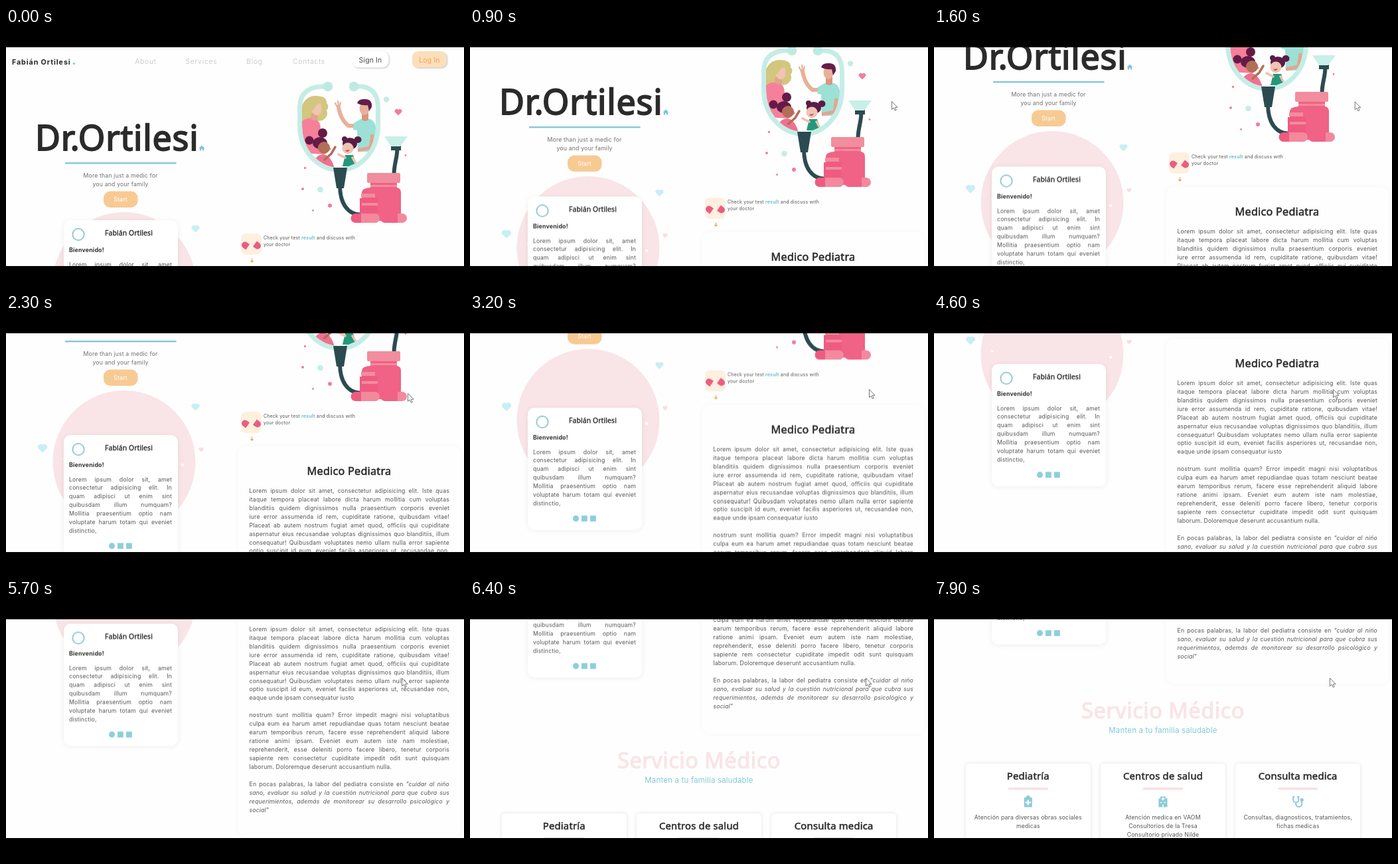
Recreate the animation shown at these times as an HTML page. Size 690 by 388 pixels, loop 8000 ms.

```html
<!DOCTYPE html>
<html lang="es">
<head>
<meta charset="utf-8">
<title>Medical practice page</title>
<style>
html, body { margin: 0; width: 100%; height: 100%; overflow: hidden; background: #000; }
#stage { position: relative; width: 690px; height: 388px; background: #fefefe; overflow: hidden; clip-path: inset(29px 0 30px);
  font: 8.7px Inter, sans-serif; letter-spacing: .02em; color: #555; }
#page, #card { position: absolute; left: 0; top: 0; will-change: transform; }
svg { position: absolute; left: 0; top: 0; overflow: visible; }
.head { font-family: "Noto Sans", sans-serif; letter-spacing: .015em; fill: #2b2b2b; stroke: #2b2b2b; stroke-width: .036em; }
.head.pale { fill: #fae4e6; stroke: #fae4e6; }
.mid { text-anchor: middle; }
.lines { position: absolute; }
.lines div { height: 12.96px; line-height: 12.96px; text-align: justify; text-align-last: justify; }
.lines div.end { text-align-last: left; }
#panel { position: absolute; left: 350px; top: 361px; width: 335px; height: 380px; border-radius: 12px; background: #fefefe; box-shadow: 0 0 10px rgba(0,0,0,.03); }
#box { position: absolute; left: 87px; top: 288.5px; width: 172px; height: 184px; border-radius: 10px; background: #fff; box-shadow: 0 1px 9px rgba(0,0,0,.07); }
.tile { fill: #fff; filter: drop-shadow(0 0 2.5px rgba(0,0,0,.11)); }
.button { filter: drop-shadow(1px 1px 1.2px rgba(0,0,0,.24)); }
</style>
</head>
<body>
<div id="stage">
  <div id="page">
    <div id="panel"></div>
    <svg width="690" height="1000" fill="#555">
      <defs>
        <path id="heart" d="M0 5L-5 0A3.1 3.1 0 0 1 0-3.6A3.1 3.1 0 0 1 5 0Z"/>
        <clipPath id="frame"><path d="M446 84H558V146C558 188 530 210 502 210S446 188 446 146Z"/></clipPath>
      </defs>

      <!-- navigation -->
      <text x="9" y="54.7" font-size="10.7" font-weight="700" letter-spacing=".9" fill="#262626">Fabián Ortilesi</text>
      <circle cx="102.5" cy="53.5" r="1.8" fill="#8fd3da"/>
      <g class="mid" font-size="10.2" font-weight="300" letter-spacing=".85" fill="#bdbdbd">
        <text x="210.5" y="53.7">About</text><text x="294.5" y="53.7">Services</text>
        <text x="374.5" y="53.7">Blog</text><text x="456.5" y="53.7">Contacts</text>
      </g>
      <rect class="button" x="522" y="35" width="54.5" height="24.5" rx="9" fill="#fff"/>
      <rect class="button" x="612" y="35" width="52" height="24.5" rx="9" fill="#fcdfba"/>
      <g class="mid" font-size="10.4">
        <text x="549" y="51.5" fill="#4a4a4a">Sign In</text><text x="638" y="51.5" fill="#f2a154">Log In</text>
      </g>

      <!-- hero -->
      <text class="head" x="44" y="184" font-size="52">Dr.Ortilesi</text>
      <path d="M290.5 181L295 176.5 299.5 181H298.2V184.6H296V182H294V184.6H291.8V181Z" fill="#7cc5d6"/>
      <rect x="89" y="202" width="167.5" height="2.4" fill="#84cad6"/>
      <g class="mid" fill="#707070">
        <text x="172.5" y="225.3">More than just a medic for</text>
        <text x="172.5" y="238.3">you and your family</text>
      </g>
      <rect x="147" y="245.5" width="51.5" height="24.5" rx="10" fill="#f8ca93"/>
      <text class="mid" x="172.5" y="261" font-size="8.8" fill="#fff">Start</text>
      <circle cx="178" cy="384.5" r="107.5" fill="#f9e4e7"/>
      <g fill="#c8eef6">
        <use href="#heart" transform="translate(285.5 302) scale(1.1)"/>
        <use href="#heart" transform="translate(55 364) scale(1.3)"/>
        <use href="#heart" transform="translate(294 366) scale(.7)" fill="#fadde2"/>
      </g>
      <g fill="#fff"><circle cx="266" cy="389" r="2.2"/><circle cx="88" cy="380" r="1.8"/></g>

      <!-- family inside the stethoscope -->
      <g clip-path="url(#frame)">
        <path d="M446 116Q453 101 468 102Q484 103 483 113Q488 118 483 124Q487 132 477 139L446 143Z" fill="#d3c67e"/>
        <path d="M444 142Q452 134 464 136Q474 139 474 152L475 166 490 182 480 190 444 188Z" fill="#f5809a"/>
        <path d="M460 128H470V137Q464 142 459 136Z" fill="#dfa58f"/>
        <path d="M461 113H474Q477 124 473 130Q466 134 461 126Z" fill="#f0c5b2"/>
        <path d="M457 112Q466 103 480 110Q468 112 463 124Q455 121 457 112Z" fill="#d3c67e"/>
        <path d="M532 147L516 147Q504 138 501 119" fill="none" stroke="#e8b09a" stroke-width="6" stroke-linecap="round"/>
        <path d="M500 121L496 113M501 119L500 110M502 120L504 112" stroke="#e8b09a" stroke-width="2.2" stroke-linecap="round"/>
        <path d="M524 143L534 137H549Q558 141 558 156V186H530L529 154 523 153Z" fill="#9de0d6"/>
        <path d="M552 160L549 180 530 184" fill="none" stroke="#e4a48e" stroke-width="5" stroke-linejoin="round"/>
        <path d="M536 128H546V138Q541 142 536 138Z" fill="#d9967f"/>
        <ellipse cx="540" cy="121" rx="7.5" ry="10" fill="#e8b09a"/>
        <path d="M529 113Q531 106 541 107Q552 107 551 119L547 125 545 116Q536 117 529 113Z" fill="#641e49"/>
        <path d="M464 207Q464 192 477 190Q490 191 495 212Z" fill="#f0708f"/>
        <g fill="#651b47"><circle cx="457" cy="169" r="6.5"/><circle cx="477" cy="158" r="7"/><ellipse cx="473" cy="173" rx="11" ry="9"/></g>
        <ellipse cx="479" cy="180" rx="9" ry="9" fill="#b26f58"/>
        <path d="M480 198L490 189 496 179" fill="none" stroke="#b26f58" stroke-width="3.5" stroke-linecap="round"/>
        <path d="M511 191H523L528 208H507Z" fill="#24987c"/>
        <path d="M511 195L501 190M522 195L526 202" stroke="#efc0ad" stroke-width="3.5" stroke-linecap="round"/>
        <g fill="#591c46"><circle cx="510" cy="167" r="4"/><ellipse cx="530" cy="168" rx="5.5" ry="5"/><ellipse cx="518" cy="174" rx="11" ry="9"/></g>
        <ellipse cx="515" cy="181" rx="8.5" ry="8.5" fill="#f0c4b2"/>
        <path d="M511 184Q515 189 518 183Z" fill="#d74865"/>
      </g>
      <path d="M485 88H473Q442.5 91 442.5 120V146C442.5 188 473 213.5 502 213.5S560.5 188 560.5 146V120Q560.5 91 536 88H524" fill="none" stroke="#c4ede6" stroke-width="7"/>
      <g fill="#bdeae2"><circle cx="485" cy="88" r="7.3"/><circle cx="524" cy="88" r="7.3"/></g>
      <g fill="none" stroke="#2b4b51" stroke-width="6">
        <path d="M503 236C503 263 514 281 536 281"/><path d="M589.5 180C589.5 197 584.5 203 584.5 221"/>
      </g>
      <path d="M493 210H514L509 241H498ZM580 177H595V184H580Z" fill="#2b4b51"/>
      <path d="M570 163H605L594 178H580Z" fill="#c8efe8"/>
      <path d="M549 232H589V240Q595 241 595 247V290H536V247Q536 241 549 240Z" fill="#f06286"/>
      <rect x="544" y="218" width="50" height="15" rx="2" fill="#f18d9e"/>
      <path d="M536 251H555V256H560V290H533V256H536Z" fill="#ef5b80"/>
      <path d="M535 249H556V255H535ZM536 263H560V267H536ZM549 236H589V239H549Z" fill="#f18d9e"/>
      <rect x="519.5" y="279" width="43" height="14" rx="7" fill="#ef5b80"/>
      <path d="M535 279H556A7 7 0 0 1 556 293H535ZM571 279H597A7 7 0 0 1 597 293H571Z" fill="#f3899d"/>
      <path d="M571 279A7 7 0 0 0 571 293H590V279Z" fill="#f06286"/>
      <g fill="#f17f9a">
        <use href="#heart" x="591" y="126.5"/>
        <circle cx="450.5" cy="210.5" r="1.7"/><circle cx="447" cy="242" r="2"/><circle cx="488" cy="267" r="3"/>
        <circle cx="462.5" cy="274.5" r="1.4"/><circle cx="602" cy="191.5" r="1.4"/>
      </g>
      <g fill="#c4ede6"><circle cx="573" cy="107.5" r="4.2"/><circle cx="473.5" cy="243" r="4.3"/></g>

      <!-- test result note -->
      <rect x="354" y="309" width="31" height="32" rx="8" fill="#fdf0de"/>
      <g fill="#ec5c82">
        <path d="M-5-5H0A5 5 0 0 1 0 5H-5Z" transform="translate(360 326.5) rotate(215)"/>
        <path d="M-5-5H0A5 5 0 0 1 0 5H-5Z" transform="translate(379 327.5) rotate(35)"/>
      </g>
      <path d="M370.5 346.5V352M368.3 350L370.5 352.2 372.7 350" fill="none" stroke="#f0a44e" stroke-width="1.2"/>
      <g font-size="7">
        <text x="388" y="317.8">Check your test <tspan font-weight="700" fill="#70bfd0">result</tspan> and discuss with</text>
        <text x="388" y="328.3">your doctor</text>
      </g>

      <text class="head mid" x="517" y="403.7" font-size="16.2">Medico Pediatra</text>

      <!-- services -->
      <text class="head pale mid" x="345" y="793" font-size="32.6">Servicio Médico</text>
      <text class="mid" x="345" y="814.5" font-size="11.5" fill="#84cad7">Manten a tu familia saludable</text>
      <g id="services"></g>
    </svg>
    <div class="lines" id="article" style="left:366.5px;top:421.8px;width:301.5px"></div>
  </div>

  <div id="card">
    <div id="box"></div>
    <svg width="690" height="500" fill="#333">
      <circle cx="109" cy="310.5" r="8.7" fill="#fff" stroke="#94cbd8" stroke-width="2"/>
      <text class="head" x="149" y="312.3" font-size="10.3">Fabián Ortilesi</text>
      <text x="95" y="336.8" font-size="8.8" font-weight="700">Bienvenido!</text>
      <g fill="#8ccfdb">
        <circle cx="159.5" cy="455.7" r="4.6"/><rect x="168" y="451.3" width="8.8" height="8.8"/><rect x="181" y="451.3" width="8.8" height="8.8"/>
      </g>
    </svg>
    <div class="lines" id="intro" style="left:95px;top:349.5px;width:155px"></div>
  </div>

  <svg id="cursor" width="12" height="16"><path d="M.5.5V12.5L3.3 10 5.2 14.3 7.2 13.4 5.3 9.300H9Z" fill="#fff" stroke="#555" stroke-width=".8"/></svg>
</div>

<script>
const $ = id => document.getElementById(id);

// A trailing "|" marks the left-aligned end of a paragraph.
const setLines = (id, text) => {
  $(id).innerHTML = text.trim().split('\n').map(line =>
    `<div class="${line.endsWith('|') ? 'end' : ''}">${line.replace('|', '')}</div>`).join('');
};

setLines('intro', `
Lorem ipsum dolor sit, amet
consectetur adipisicing elit. In
quam adipisci ut enim sint
quibusdam illum numquam?
Mollitia praesentium optio nam
voluptate harum totam qui eveniet
distinctio,|`);

setLines('article', `
Lorem ipsum dolor sit amet, consectetur adipisicing elit. Iste quas
itaque tempora placeat labore dicta harum mollitia cum voluptas
blanditiis quidem dignissimos nulla praesentium corporis eveniet
iure error assumenda id rem, cupiditate ratione, quibusdam vitae!
Placeat ab autem nostrum fugiat amet quod, officiis qui cupiditate
aspernatur eius recusandae voluptas dignissimos quo blanditiis, illum
consequatur! Quibusdam voluptates nemo ullam nulla error sapiente
optio suscipit id eum, eveniet facilis asperiores ut, recusandae non,
eaque unde ipsam consequatur iusto|
|
nostrum sunt mollitia quam? Error impedit magni nisi voluptatibus
culpa eum ea harum amet repudiandae quas totam nesciunt beatae
earum temporibus rerum, facere esse reprehenderit aliquid labore
ratione animi ipsam. Eveniet eum autem iste nam molestiae,
reprehenderit, esse deleniti porro facere libero, tenetur corporis
sapiente rem consectetur cupiditate impedit odit sunt quisquam
laborum. Doloremque deserunt accusantium nulla.|
|
En pocas palabras, la labor del pediatra consiste en <i>“cuidar al niño</i>
<i>sano, evaluar su salud y la cuestión nutricional para que cubra sus</i>
<i>requerimientos, además de monitorear su desarrollo psicológico y</i>
<i>social”</i>|`);

const clipboard = `<path d="M-6-6.5H-3A3 3 0 0 1 3-6.5H6V8H-6Z" fill="#8acbd8"/>
  <path d="M0-3V5M-4 1H4" stroke="#fff" stroke-width="2.4"/>`;
const hospital = `<path d="M-4-8H4V-5H6.5V8H-6.5V-5H-4Z" fill="#8acbd8"/>
  <path d="M0-7V-2M-2.5-4.5H2.5M-4 1H-1.5M1.5 1H4M0 4V8" stroke="#fff" stroke-width="1.7"/>`;
const stethoscope = `<path d="M-5-7.5H-7V-3A4 4 0 0 0 1-3V-7.5H-1M-3 1V3A4.5 4.5 0 0 0 6 3V-2" fill="none" stroke="#8acbd8" stroke-width="2"/>
  <circle cx="6" cy="-3" r="2.6" fill="#8acbd8"/>`;

const services = [
  ['Pediatría', clipboard, ['Atención para diversas obras sociales', 'medicas']],
  ['Centros de salud', hospital, ['Atención medica en VAOM', 'Consultorios de la Tresa', 'Consultorio privado Nilde']],
  ['Consulta medica', stethoscope, ['Consultas, diagnosticos, tratamientos,', 'fichas medicas']],
];
$('services').innerHTML = services.map(([title, icon, lines], i) => `
  <g class="mid" transform="translate(${141.8 + 203.2 * i} 861)">
    <rect class="tile" x="-94" width="188" height="130" rx="5"/>
    <text class="head" y="23.5" font-size="14.8">${title}</text>
    <rect x="-30" y="36" width="60" height="3.6" fill="#fbe1e4"/>
    <g transform="translate(0 57.5)">${icon}</g>
    ${lines.map((line, k) => `<text y="${84.2 + 12.96 * k}">${line}</text>`).join('')}
  </g>`).join('');

const LOOP = 8000, STEP = 100, CARD_SPEED = .66;

// Each move: start time, end time, values reached.
const scrollMoves = [
  [350, 800, 54], [1000, 1300, 108], [1450, 1900, 162], [2350, 2700, 216],
  [3100, 3500, 270], [3950, 4300, 324], [4600, 4900, 378], [5650, 6000, 486],
  [6100, 6400, 540], [6850, 7300, 594], [7650, 8237, 648],
];
const cursorMoves = [[1500, 2300, 605, 119], [2850, 3100, 601, 113], [4700, 4900, 596, 117]];

const follow = (moves, start, t) => moves.reduce((now, [from, to, ...goal]) => {
  const u = Math.min(1, Math.max(0, (t - from) / (to - from)));
  const eased = u * u * (3 - 2 * u);
  return now.map((v, i) => v + (goal[i] - v) * eased);
}, start);

function draw() {
  const t = Math.floor(performance.now() % LOOP / STEP) * STEP;
  const [scroll] = follow(scrollMoves, [0], t);
  const [x, y] = follow(cursorMoves, [635, 110], t);
  $('page').style.transform = `translateY(${-scroll}px)`;
  $('card').style.transform = `translateY(${-scroll * CARD_SPEED}px)`;
  $('cursor').style.transform = `translate(${x}px, ${y}px)`;
  $('cursor').style.visibility = t < 400 ? 'hidden' : 'visible';
  requestAnimationFrame(draw);
}
draw();
</script>
</body>
</html>
```
